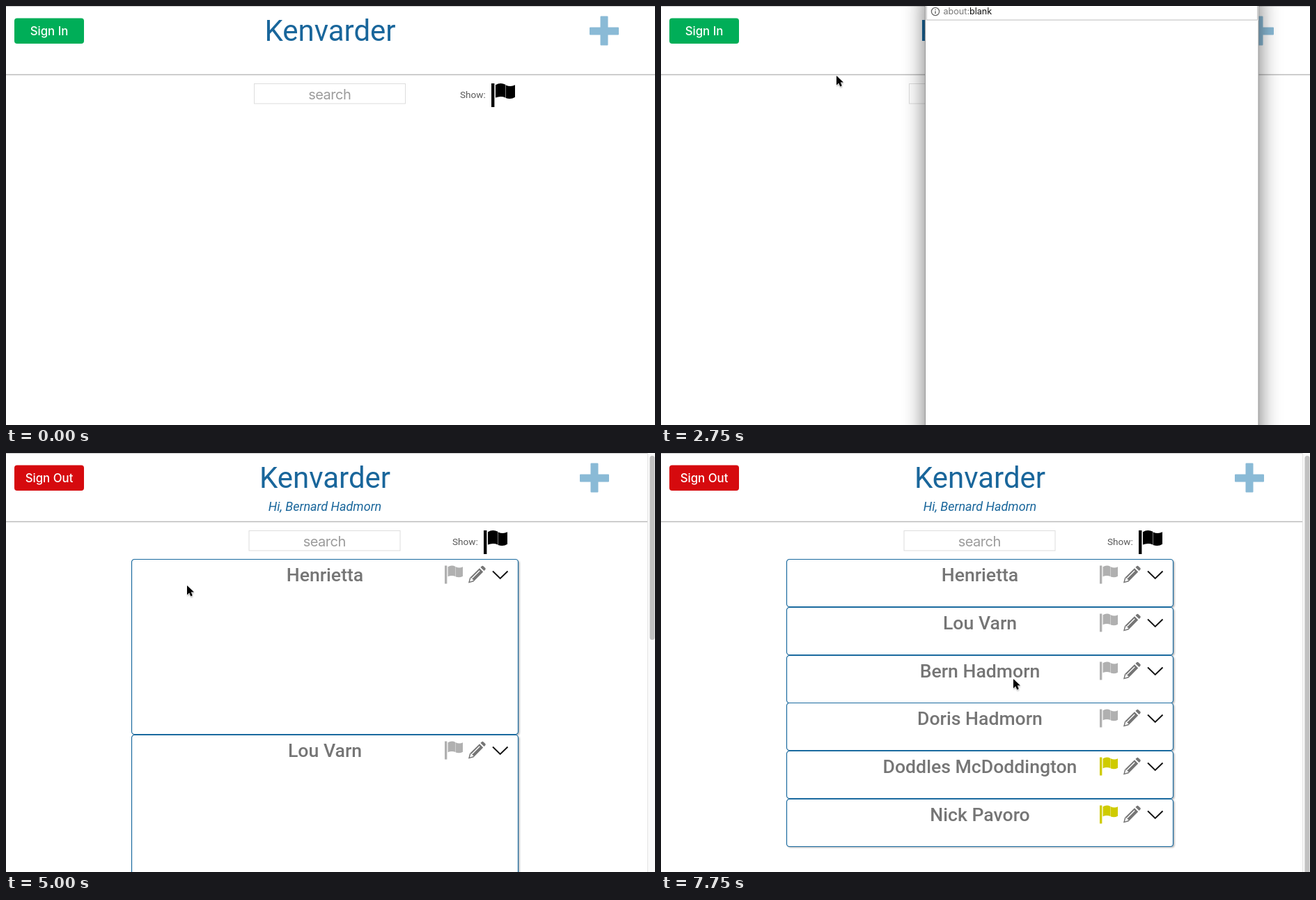
These frames come from a looping animation (932x601 px, 8000 ms). An HTML page:

```html
<!DOCTYPE html>
<html lang="en">
<head>
<meta charset="utf-8">
<title>Contact list</title>
<style>
  html, body { margin: 0; width: 100%; height: 100%; overflow: hidden; background: #fff; }
  svg { display: block; width: 932px; height: 601px; }
  text { font-family: Roboto, sans-serif; }
  .ui { font-family: Inter, sans-serif; }
  .mid { text-anchor: middle; }
  .name { font-size: 26.6px; font-weight: 500; fill: #757575; }
  .url { font-size: 12.6px; fill: #777; }
</style>
</head>
<body>
<svg viewBox="0 0 932 601">
  <defs>
    <g id="flag">
      <path d="M0 0H4.4V34H0Z"/>
      <path d="M6 2.2Q13-2 20.3 1.8V20.4Q13 17.5 6 20.6Z"/>
      <path d="M20.7 2.4Q28 5.6 34 2.2V19.8Q28 23.6 20.7 21Z"/>
    </g>
    <g id="pencil">
      <path d="M0 25L2 17.5 16 3.8 21.2 9 7.4 22.9Z M17.4 2.4L19.2.7Q20.3-.3 21.4.7L24.3 3.6Q25.3 4.7 24.3 5.8L22.6 7.6Z" fill="#757575"/>
      <path d="M5.2 18.2L16.2 7.3M3 22L4 18.6 6.4 21Z" fill="#fff" stroke="#fff" stroke-width="1.3"/>
    </g>
    <filter id="blur" x="-30%" y="-30%" width="160%" height="160%">
      <feGaussianBlur stdDeviation="16"/>
    </filter>
    <filter id="soft"><feGaussianBlur stdDeviation="1"/></filter>
  </defs>
  <rect width="932" height="601" fill="#fff"/>

  <path d="M0 .5H932" stroke="#ccc"/>
  <path d="M0 98.5H932" stroke="#bbb" stroke-width="1.4"/>
  <rect id="ring" x="10.5" y="15.8" width="103.5" height="40" rx="3" fill="none" stroke="#86b7f7" stroke-width="2.6"/>
  <rect id="button" x="12" y="17.5" width="100" height="36.5" rx="4"/>
  <text id="label" class="ui mid" x="62" y="42" font-size="16.8" font-weight="500" fill="#fff"></text>
  <g id="center">
    <text class="mid" x="465.5" y="49.5" font-size="42" fill="#19669b">Kenvarder</text>
    <rect x="356.5" y="111.5" width="217" height="28.5" fill="#fff" stroke="#ddd"/>
    <text class="ui mid" x="464.7" y="133.5" font-size="20" letter-spacing="-.5" fill="#9c9c9c">search</text>
  </g>
  <path id="plus" d="M853.5 15.5q0-1 1-1h9q1 0 1 1v15h14.5q1 0 1 1v9q0 1-1 1h-14.5v14q0 1-1 1h-9q-1 0-1-1v-14H839q-1 0-1-1v-9q0-1 1-1h14.5Z" fill="#8abad6"/>
  <g id="show">
    <text x="652" y="132" font-size="13.6" fill="#595959">Show:</text>
    <use href="#flag" x="697" y="111"/>
  </g>

  <g id="account">
    <text class="mid" x="458" y="82.5" font-size="18" font-style="italic" fill="#19669b">Hi, Bernard Hadmorn</text>
    <g id="cards"></g>
    <rect x="921" width="11" height="601" fill="#fafafa"/>
    <path d="M921.5 0V601" stroke="#e4e4e4"/>
    <rect id="thumb" x="924.5" y="4" width="7" rx="3.5" fill="#c1c1c1"/>
  </g>

  <g id="popup">
    <rect x="380" y="-20" width="478" height="720" fill="#000" opacity=".58" filter="url(#blur)"/>
    <rect x="379.5" y="-40" width="478.5" height="700" fill="#fff" stroke="#999"/>
    <rect x="380" y="0" width="477.5" height="21" fill="#f2f2f2"/>
    <path d="M381.5 0V20H856.5V0" fill="#fff" stroke="#c4c4c4"/>
    <g id="blank">
      <circle cx="394" cy="8" r="5.6" fill="none" stroke="#666" stroke-width="1.3"/>
      <path d="M394 7.2V11M394 4.7V6.1" stroke="#666" stroke-width="1.4"/>
      <text class="ui url" x="405.5" y="12.3">about:<tspan fill="#111">blank</tspan></text>
    </g>
    <g id="loaded">
      <rect x="390" y="6.5" width="7.5" height="6" rx="1" fill="#0b8043"/>
      <path d="M391.7 7V5.2a2 2 0 0 1 4 0V7" fill="none" stroke="#0b8043" stroke-width="1.3"/>
      <text class="ui url" y="12.3"><tspan x="405.5" fill="#0b8043">https</tspan>://<tspan x="449" fill="#111">kenvarder-3d622.firebaseapp.com</tspan><tspan x="659.5">/__/auth/handler?state=AF...</tspan></text>
      <g fill="none" stroke="#666" stroke-width="1.4">
        <circle cx="843.5" cy="6.5" r="4.6"/>
        <path d="M847 10L851 14M841.3 6.5H845.7"/>
      </g>
    </g>
  </g>

  <g id="cursor">
    <path d="M0 1V14.5L3.2 11.6 5.3 16.4 7.8 15.3 5.7 10.6H10Z" transform="translate(.5 1)" fill="#000" opacity=".35" filter="url(#soft)"/>
    <path d="M0 0V13.5L3.2 10.6 5.3 15.4 7.8 14.3 5.7 9.6H10Z" fill="#000" stroke="#fff" paint-order="stroke"/>
  </g>
</svg>
<script>
const LOOP = 8000, STEP = 250;
const $ = id => document.getElementById(id);
const show = (id, on) => $(id).setAttribute("display", on ? "inline" : "none");
const shift = (id, dx) => $(id).setAttribute("transform", `translate(${dx})`);

const people = [
  ["Henrietta"], ["Lou Varn"], ["Bern Hadmorn"], ["Doris Hadmorn"],
  ["Doddles McDoddington", true], ["Nick Pavoro", true]
];

// time, x, y of the pointer tip
const trail = [
  [250, 674, 134], [500, 343, 133], [750, 110, 57], [1000, 86, 42],
  [1250, 86, 42], [1500, 80, 41.5], [2250, 80, 41.5], [2750, 252, 100],
  [3500, 252, 100], [4750, 262, 190], [5000, 260, 190], [5500, 421, 180],
  [6000, 520, 160], [6500, 817, 62], [6750, 750, 108], [7250, 464, 303],
  [7750, 506, 324]
];

$("cards").innerHTML = people.map(([name, marked]) => `<g>
  <rect class="shade" x="182" y="2" width="555.5" rx="4" fill="#000" opacity=".3" filter="url(#soft)"/>
  <rect class="box" x="180.5" y=".5" width="555" rx="4" fill="#fff" stroke="#1a6a9f" stroke-width="1.2"/>
  <text class="name mid" x="458" y="31.5">${name}</text>
  <use href="#flag" transform="translate(630 9.5) scale(.765)" fill="${marked ? "#cfcb00" : "#b0b0b0"}"/>
  <use href="#pencil" x="664" y="9.5"/>
  <path d="M699 17.5L709.7 28 720.5 17.5" fill="none" stroke="#111" stroke-width="1.9"/>
</g>`).join("");
const cards = [...$("cards").children];

function pointAt(t) {
  let i = 0;
  while (i < trail.length - 2 && t > trail[i + 1][0]) i++;
  const [t0, x0, y0] = trail[i], [t1, x1, y1] = trail[i + 1];
  const k = (t - t0) / (t1 - t0);
  return [x0 + (x1 - x0) * k, y0 + (y1 - y0) * k];
}

function layCards(t) {
  const open = Math.max(0, 1 - (t - 5000) / 500);
  const pitch = 68.75 + 183.25 * open;
  cards.forEach((card, i) => {
    card.setAttribute("transform", `translate(0 ${Math.round(152 + i * pitch)})`);
    for (const rect of card.querySelectorAll("rect")) {
      rect.setAttribute("height", Math.round(pitch - 1));
    }
  });
  $("thumb").setAttribute("height", 670 * 670 / Math.max(670, 188 + 6 * pitch));
}

function draw(time) {
  const t = Math.floor(time % LOOP / STEP) * STEP;
  const signedIn = t >= 5000;
  const hover = t >= 1500 && t < 2500;

  show("account", signedIn);
  show("popup", t >= 2250 && !signedIn);
  show("blank", t < 3250);
  show("loaded", t >= 3250);
  show("ring", t === 2000);
  show("cursor", t >= 250);

  $("button").setAttribute("fill", signedIn ? "#d60a0e" : hover ? "#00944a" : "#00ae58");
  $("label").textContent = signedIn ? "Sign Out" : "Sign In";
  shift("center", signedIn ? -7.5 : 0);
  shift("plus", signedIn ? -14 : 0);
  shift("show", signedIn ? -11 : 0);
  if (signedIn) layCards(t);

  if (t >= 250) $("cursor").setAttribute("transform", `translate(${pointAt(t)})`);
}

const start = performance.now();
function tick() {
  draw(performance.now() - start);
  requestAnimationFrame(tick);
}
tick();
</script>
</body>
</html>
```
